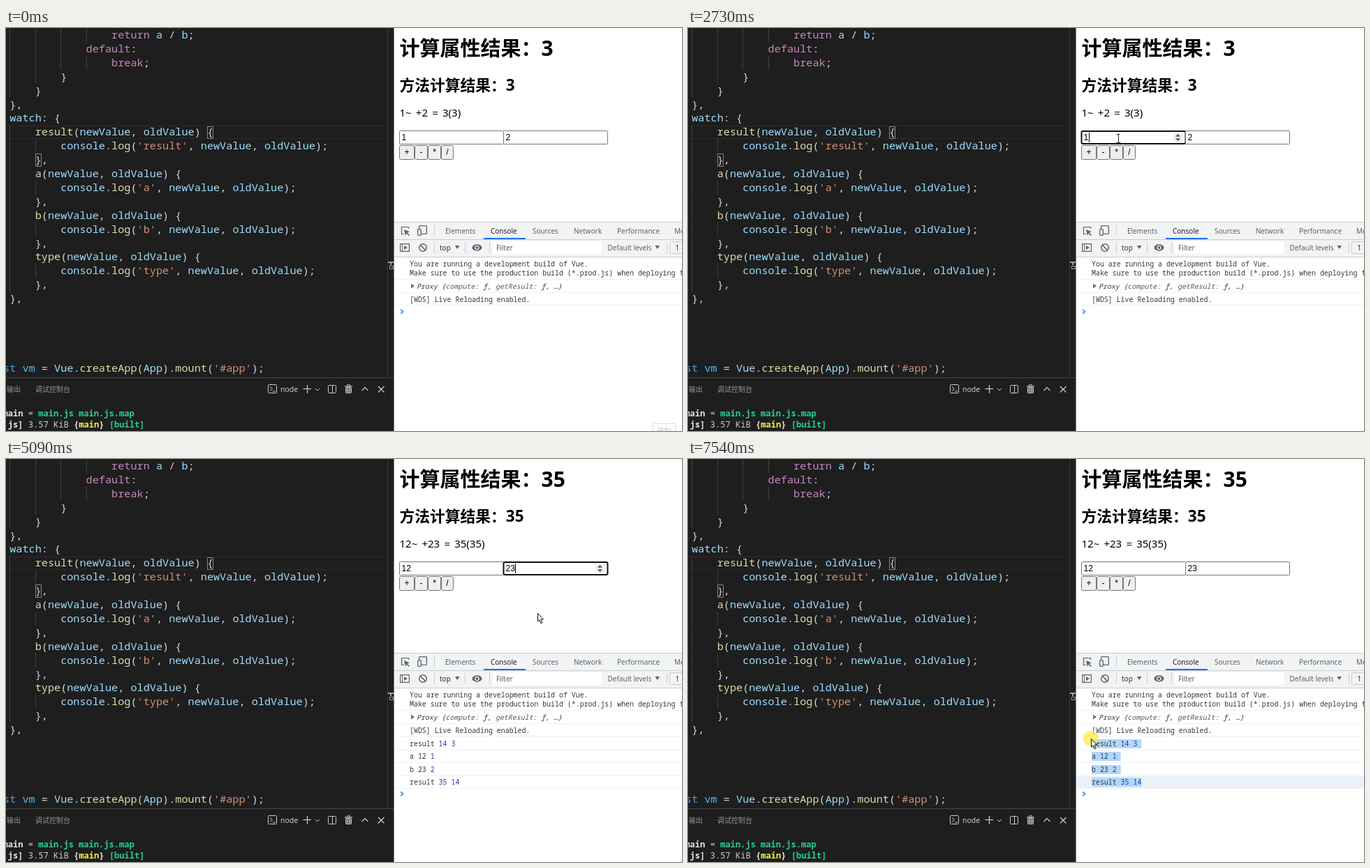
These frames come from a looping animation (968x578 px, 8 s). An HTML page with a canvas:

```html
<!DOCTYPE html>
<html lang="zh-CN">
<head>
<meta charset="utf-8">
<title>Watch demo</title>
<style>
html, body { margin: 0; width: 100%; height: 100%; overflow: hidden; background: #fff; }
canvas { display: block; }
</style>
</head>
<body>
<canvas id="stage" width="968" height="578"></canvas>
<script>
const ctx = document.getElementById('stage').getContext('2d');
const LOOP = 8000;
const MONO = '"Noto Sans Mono", monospace';
const SANS = '"Noto Sans", "Noto Sans CJK SC", "Noto Sans CJK", sans-serif';
const CJK = '"Noto Sans CJK SC", "Noto Sans CJK", sans-serif';
const ARIAL = '"Liberation Sans", sans-serif';

function rect(x, y, w, h, color) {
  ctx.fillStyle = color;
  ctx.fillRect(x, y, w, h);
}
// Baselines snap to whole pixels to stay sharp.
function text(str, x, y, font, color, align = 'left') {
  ctx.font = font;
  ctx.fillStyle = color;
  ctx.textAlign = align;
  ctx.fillText(str, x, Math.round(y));
}
// Polyline from a flat list of coordinates.
function trace(points, closed) {
  ctx.beginPath();
  for (let i = 0; i < points.length; i += 2) ctx.lineTo(points[i], points[i + 1]);
  if (closed) ctx.closePath();
}
function line(points, color, width = 1) {
  trace(points);
  ctx.strokeStyle = color;
  ctx.lineWidth = width;
  ctx.stroke();
}
function poly(points, color) {
  trace(points, true);
  ctx.fillStyle = color;
  ctx.fill();
}
function box(x, y, w, h, radius, fill, stroke, width = 1) {
  ctx.beginPath();
  ctx.roundRect(x + width / 2, y + width / 2, w - width, h - width, radius);
  if (fill) { ctx.fillStyle = fill; ctx.fill(); }
  ctx.strokeStyle = stroke;
  ctx.lineWidth = width;
  ctx.stroke();
}
function disc(x, y, r, fill, stroke, width = 1) {
  ctx.beginPath();
  ctx.arc(x, y, r, 0, Math.PI * 2);
  if (fill) { ctx.fillStyle = fill; ctx.fill(); }
  if (stroke) { ctx.strokeStyle = stroke; ctx.lineWidth = width; ctx.stroke(); }
}

// ---- Code editor ----
const CODE = `                    return a / b;
                default:
                    break;
            }
        }
    },
    watch: {
        result(newValue, oldValue) {
            console.log('result', newValue, oldValue);
        },
        a(newValue, oldValue) {
            console.log('a', newValue, oldValue);
        },
        b(newValue, oldValue) {
            console.log('b', newValue, oldValue);
        },
        type(newValue, oldValue) {
            console.log('type', newValue, oldValue);
        },
    },




const vm = Vue.createApp(App).mount('#app');`.split('\n');
const CHAR = 9.12, PITCH = 19.9, LEFT = -31.3;
const colX = col => LEFT + col * CHAR;

function tokenColor(word, next) {
  if (word[0] === "'") return '#ce9178';
  if (/^(return|default|break)$/.test(word)) return '#c586c0';
  if (word === 'const') return '#569cd6';
  if (word === 'vm') return '#4fc1ff';
  if (!/\w/.test(word)) return '#d4d4d4';
  return next === '(' ? '#dcdcaa' : '#9cdcfe';
}

function drawEditor() {
  rect(0, 0, 555, 578, '#1e1e1e');
  rect(555, 0, 1, 578, '#808080');
  rect(0, 140, 546, 1, '#2b2b2b');
  rect(0, 158, 546, 1, '#2b2b2b');
  CODE.forEach((src, row) => {
    const indent = src.search(/\S/);
    for (let col = 4; col < indent; col += 4)
      rect(Math.round(colX(col)), row * PITCH, 1, PITCH, '#404040');
    for (const m of src.matchAll(/'[^']*'|\w+|\S/g)) {
      const next = src[m.index + m[0].length];
      text(m[0], colX(m.index), 15 + row * PITCH, '500 15.2px ' + MONO, tokenColor(m[0], next));
    }
  });
  box(288, 141, 9, 18, 0, null, '#888888');
  box(42, 180, 9, 19, 0, null, '#888888');
  rect(546, 0, 1, 501, '#383838');
  rect(547, 335, 8, 2, '#a0a0a0');
  rect(550, 337, 2, 3, '#a0a0a0');
  box(549, 341, 6, 5, 0, null, '#a0a0a0');
}

function drawPanel() {
  const ink = '#cccccc', y = 518;
  rect(0, 501, 555, 1, '#464646');
  text('输出', 1, 522, '10px ' + CJK, '#969696');
  text('调试控制台', 42, 522, '10px ' + CJK, '#969696');
  box(375, 511, 13, 13, 1, null, ink);
  line([378, 514.5, 381.5, 517.5, 378, 520.5], ink);
  line([382, 521, 386, 521], ink);
  text('node', 393, 522, '10.5px ' + SANS, ink);
  line([425.5, y - .5, 437, y - .5], ink, 1.2);
  line([431.5, 512, 431.5, 524], ink, 1.2);
  line([443, 517, 446, 520, 449, 517], ink);
  box(461, 512, 12, 12, 1, null, ink);
  line([467.5, 512, 467.5, 524], ink);
  line([485, 514, 496, 514], ink, 1.3);
  line([488.5, 513, 488.5, 511.8, 492.5, 511.8, 492.5, 513], ink);
  box(486, 515, 9, 9, 1, '#6d6a66', ink);
  line([489, 517, 489, 522], ink);
  line([492, 517, 492, 522], ink);
  line([509.5, 520, 514, 515.5, 518.5, 520], ink, 1.2);
  line([533, 514, 541.5, 522.5], ink, 1.2);
  line([541.5, 514, 533, 522.5], ink, 1.2);

  const bold = 'bold 12.08px ' + MONO, plain = '12.08px ' + MONO;
  const at = col => -4.6 + col * 7.25;
  text('main', at(0), 557, bold, '#e5e5e5');
  text('=', at(5), 557, plain, '#cccccc');
  text('main.js main.js.map', at(7), 557, bold, '#23d18b');
  text('.js]', at(0), 573, bold, '#e5e5e5');
  text('3.57 KiB', at(5), 573, plain, '#cccccc');
  text('{', at(14), 573, bold, '#e5e5e5');
  text('main', at(15), 573, bold, '#f5f543');
  text('}', at(19), 573, bold, '#e5e5e5');
  text('[built]', at(21), 573, bold, '#23d18b');
}

// ---- Page ----
// Caret periods for each input.
const CARETS = [
  { from: 1650, to: 3800, on: [[1650, 2180], [2730, 3800]] },
  { from: 3800, to: 6780, on: [[3800, 4350], [4610, 5140], [5730, 6260]] }
];

function drawInput(x, w, value, caret, t) {
  const focus = t >= caret.from && t < caret.to;
  if (focus) {
    box(x - .5, 147, w + 1, 20, 2, '#fff', '#101010', 2);
    rect(x + 132, 150, 13, 14, '#efefef');
    poly([x + 135, 155.7, x + 138.5, 152, x + 142, 155.7], '#505050');
    poly([x + 135, 158.3, x + 138.5, 162, x + 142, 158.3], '#505050');
  } else {
    box(x, 147, w, 20, 1, '#fff', '#767676');
  }
  text(value, x + 3.5, 161, '12.08px ' + ARIAL, '#000');
  if (focus && caret.on.some(([a, b]) => t >= a && t < b))
    rect(x + 4 + Math.round(value.length * 6.72), 150, 1, 14, '#000');
}

function drawPage(t) {
  const a = t < 3000 ? 1 : 12, b = t < 4610 ? 2 : 23, sum = a + b;
  rect(556, 0, 412, 278, '#fff');
  text('计算属性结果：', 563.5, 39.5, 'bold 29px ' + CJK, '#000');
  text(sum, 766.5, 39.5, 'bold 30px ' + SANS, '#000');
  text('方法计算结果：', 563.5, 89.5, 'bold 21.75px ' + CJK, '#000');
  text(sum, 715.8, 89.5, 'bold 22.5px ' + SANS, '#000');
  ctx.wordSpacing = '2.3px';
  text(`${a}~ +${b} = ${sum}(${sum})`, 563.5, 127, '15px ' + SANS, '#000');
  ctx.wordSpacing = '0px';
  drawInput(563, 150, String(a), CARETS[0], t);
  drawInput(712, 150, String(b), CARETS[1], t);
  let x = 563;
  [['+', 22], ['-', 19], ['*', 19], ['/', 18]].forEach(([label, w]) => {
    box(x, 168, w, 21, 2, '#efefef', '#767676');
    text(label, x + w / 2, 182, '12.08px ' + ARIAL, '#000', 'center');
    x += w;
  });
}

// ---- Developer tools ----
function drawToolbar() {
  const ink = '#5f6368', font = '10px ' + SANS, border = '#cacdd1';
  rect(556, 278, 412, 51, '#f1f3f4');
  for (const y of [278, 303, 328]) rect(556, y, 412, 1, border);
  [['Elements', 629], ['Console', 694], ['Sources', 754], ['Network', 813],
   ['Performance', 875], ['Memory', 957]].forEach(([name, x]) =>
    text(name, x, 294.5, font, name === 'Console' ? '#202124' : ink));
  rect(684, 301, 60, 2, '#1a73e8');

  line([570, 295.5, 566.5, 295.5, 566.5, 285.5, 576.5, 285.5, 576.5, 288], ink, 1.2);
  poly([570, 289, 578, 292.2, 574.6, 293.4, 578, 297, 576.8, 298, 573.3, 294.6, 572, 298], ink);
  box(591, 283, 12, 13, 1, null, ink, 1.3);
  box(589, 288, 6, 10, 1, '#f1f3f4', ink, 1.3);

  box(564, 309, 14, 12, 0, null, ink, 1.2);
  line([567.5, 309, 567.5, 321], ink);
  poly([570, 312, 575, 315, 570, 318], ink);
  disc(597, 315, 5.3, null, ink, 1.5);
  line([593.4, 311.4, 600.6, 318.6], ink, 1.5);
  rect(613, 283, 1, 15, border);
  for (const x of [613, 657, 692, 946]) rect(x, 307, 1, 16, border);
  text('top', 621, 318.5, font, '#333');
  poly([643, 312, 649.5, 312, 646.2, 317], ink);
  ctx.beginPath();
  ctx.ellipse(674.5, 315, 7, 4.7, 0, 0, Math.PI * 2);
  ctx.fillStyle = ink;
  ctx.fill();
  disc(674.5, 315, 3.2, '#f1f3f4');
  disc(674.5, 315, 1.9, ink);
  rect(697, 306, 156, 18, '#fff');
  text('Filter', 702, 319, font, '#5f5f5f');
  text('Default levels', 861.5, 318.5, font, ink);
  poly([929.5, 312, 936, 312, 932.7, 317], ink);
  box(950, 306, 40, 18, 2, null, border);
  text('1', 958.5, 318.5, font, '#333');
}

const CELL = 5.946, LOG_X = 578, LOG_FONT = '9.91px ' + MONO;
const ROW = 18.4, ROWS_Y = 399.2;
const LOGS = [
  { at: 3000, words: ['result', '14', '3'] },
  { at: 3000, words: ['a', '12', '1'] },
  { at: 4610, words: ['b', '23', '2'] },
  { at: 4610, words: ['result', '35', '14'] }
];
const rowTop = i => ROWS_Y + i * ROW;

function drawSelection(i, mouse) {
  const hit = Math.max(0, Math.min(3, Math.floor((mouse.y + 2 - ROWS_Y) / ROW)));
  if (i < hit) return;
  const chars = LOGS[i].words.join(' ').length + (i < 3 ? 1 : 0);
  const start = i === hit ? Math.max(LOG_X, mouse.x) : LOG_X;
  const end = LOG_X + chars * CELL;
  if (end > start) rect(start, Math.round(rowTop(i) + 2.5), end - start, 13, '#b3d7fb');
}

function drawConsole(t, mouse) {
  const dark = '#303942', rule = '#f0f0f0';
  rect(556, 329, 412, 249, '#fff');
  for (const y of [360, 379, 397]) rect(556, y, 412, 1, rule);
  text('You are running a development build of Vue.', LOG_X, 341.5, LOG_FONT, dark);
  text('Make sure to use the production build (*.prod.js) when deploying for production.',
    LOG_X, 354.5, LOG_FONT, dark);
  poly([580, 366.5, 585, 370, 580, 373.5], '#6e6e6e');
  let col = 0;
  ['Proxy {', 'compute:', ' ƒ, ', 'getResult:', ' ƒ, …}'].forEach((part, i) => {
    text(part, 588 + col * CELL, 373.5, 'italic ' + LOG_FONT, i % 2 ? '#565656' : dark);
    col += part.length;
  });
  text('[WDS] Live Reloading enabled.', LOG_X, 393, LOG_FONT, dark);

  const selecting = t >= 6780;
  const logs = LOGS.filter(log => t >= log.at);
  logs.forEach(({ words }, i) => {
    if (i === 3 && selecting) rect(556, Math.round(rowTop(i) - .7), 412, 18, '#ebf1f9');
    rect(556, Math.round(rowTop(i) + 17.5), 412, 1, rule);
    if (selecting) drawSelection(i, mouse);
    let x = LOG_X;
    words.forEach((word, k) => {
      const numeric = k === 2 || (k === 1 && words[0] === 'result');
      text(word, x, rowTop(i) + 12.5, LOG_FONT, numeric ? '#2038b0' : dark);
      x += (word.length + 1) * CELL;
    });
  });
  const y = 406.7 + logs.length * ROW;
  line([565.3, y - 3, 568.5, y, 565.3, y + 3], '#1a73e8', 1.4);
}

// ---- Mouse ----
// Each move: start, end, number of steps, then [progress, x, y] points.
const MOVES = [
  [460, 1230, 12, [[0, 948, 563], [.64, 700, 286], [1, 600, 200]]],
  [1300, 1720, 7, [[0, 599, 190], [.67, 616, 158], [1, 616, 158]]],
  [3200, 3950, 11, [[0, 622, 158], [.4, 690, 163], [.8, 739, 159], [1, 739, 159]]],
  [4880, 5660, 12, [[0, 744, 162], [.2, 774, 195], [.6, 700, 340], [1, 631, 456]]],
  [5730, 5860, 3, [[0, 640, 461], [1, 655, 465]]],
  [6660, 7400, 12, [[0, 652, 462], [.18, 642, 453], [.28, 642, 453], [1, 588, 410]]],
  [7470, 7540, 2, [[0, 581, 405], [1, 577, 401]]]
];
const CLICKS = [[1580, 1720], [3800, 3950], [6780, LOOP]];

function mouseAt(t) {
  const move = MOVES.filter(m => t >= m[0]).pop();
  if (!move) return { x: 990, y: 600 };
  const [from, to, steps, pts] = move;
  const step = Math.floor((t - from) / (to - from) * (steps - 1) + .3);
  const u = Math.min(1, step / (steps - 1));
  const i = Math.max(1, pts.findIndex(p => p[0] >= u));
  const [ua, xa, ya] = pts[i - 1], [ub, xb, yb] = pts[i];
  const k = (u - ua) / (ub - ua);
  return { x: xa + (xb - xa) * k, y: ya + (yb - ya) * k };
}

function shape(points) {
  trace(points, true);
  ctx.fillStyle = '#fff';
  ctx.fill();
  ctx.strokeStyle = '#111';
  ctx.lineWidth = 1;
  ctx.lineJoin = 'round';
  ctx.stroke();
  ctx.lineJoin = 'miter';
}

function drawMouse(t, { x, y }) {
  if (CLICKS.some(([a, b]) => t >= a && t < b)) disc(x, y, 11, 'rgba(250,236,50,.68)');
  ctx.save();
  ctx.translate(Math.round(x), Math.round(y));
  if (y > 147 && y < 167 && x > 563 && x < 861) {
    line([-2.5, -5.5, 2.5, -5.5], '#222');
    line([.5, -5, .5, 6], '#222');
    line([-2.5, 6.5, 3.5, 6.5], '#222');
  } else if (y > 278 && y < 303 && x > 620) {
    shape([-.5, 0, 1, 0, 1.5, 5, 4, 5, 6.5, 6, 7.5, 7.5, 7, 11, 5.5, 14.5, -.5, 14.5,
      -4.5, 9, -4, 7.5, -1.5, 9]);
  } else {
    shape([.5, .5, .5, 12, 3, 9.7, 5, 14.7, 7, 13.8, 4.9, 9, 8.5, 9]);
  }
  ctx.restore();
}

function drawBadge() {
  box(926, 567, 33, 20, 1, '#fff', '#dcdcdc');
  text('录制', 942.5, 582, '10.5px ' + CJK, '#c4c4c4', 'center');
}

function draw(now) {
  const t = now % LOOP, mouse = mouseAt(t);
  drawEditor();
  drawPanel();
  drawPage(t);
  drawToolbar();
  drawConsole(t, mouse);
  if (t < 70) drawBadge();
  drawMouse(t, mouse);
}
function tick() {
  draw(performance.now() - start);
  requestAnimationFrame(tick);
}
const start = performance.now();
tick();
</script>
</body>
</html>
```
